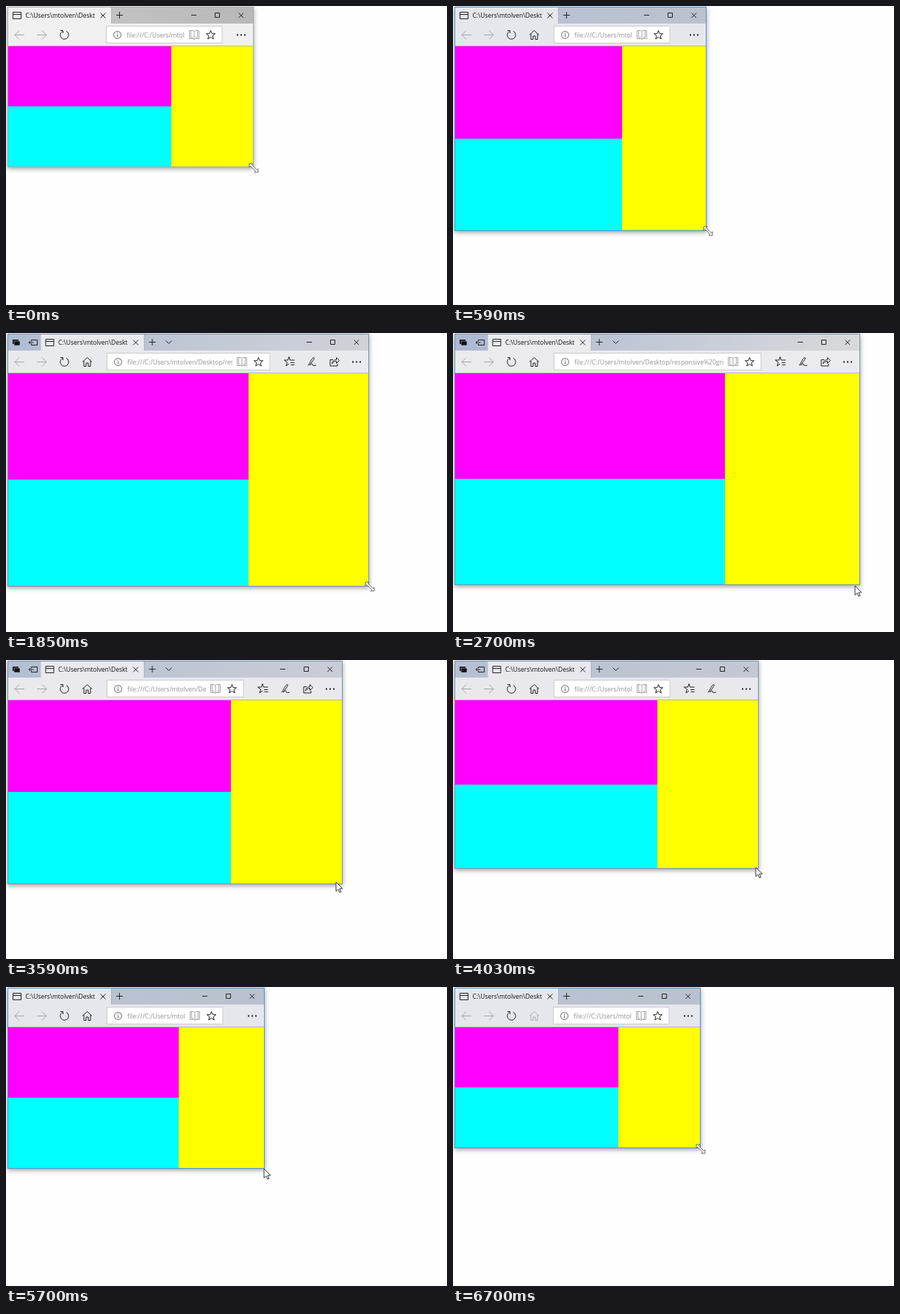
Recreate the animation shown at these times as an HTML page. Size 600 by 408 pixels, loop 6.74 s.

```html
<!DOCTYPE html>
<html lang="en">
<head>
<meta charset="utf-8">
<title>Responsive grid in a resized browser window</title>
<style>
  html, body { margin: 0; width: 100%; height: 100%; overflow: hidden; background: #fefefe; }
  svg { display: block; width: 600px; height: 408px; }
  text { font-family: "Open Sans", "Noto Sans", sans-serif; white-space: pre; }
  .line { fill: none; stroke: #222; stroke-width: 1; }
  .dim { stroke: #a6a6a6; }
  #shadow { filter: drop-shadow(0 2px 3px rgba(0, 0, 0, .38)); }
</style>
</head>
<body>
<svg viewBox="0 0 600 408">
  <defs>
    <linearGradient id="titleFill">
      <stop id="titleLeft" offset="0"/>
      <stop id="titleRight" offset="1"/>
    </linearGradient>
    <clipPath id="tabClip"><rect x="26" y="4" width="95" height="18"/></clipPath>
    <clipPath id="urlClip"><rect id="urlBox" x="160" y="28" height="22"/></clipPath>
  </defs>

  <rect id="shadow" x="2" y="1" fill="#999"/>
  <rect id="titleBar" x="3" y="2" height="23" fill="url(#titleFill)"/>
  <rect id="toolbar" x="3" y="24" height="31"/>
  <path id="toolbarEdge" class="line" stroke-opacity=".25"/>

  <g id="tabActions">
    <path d="M9 9h8v6H9z" fill="#111"/>
    <path d="M11 11h8v6h-8z" fill="#111" stroke="#b3bfd6" stroke-width=".6"/>
    <path class="line" d="M34.5 11.5v-2h8v7h-8v-2M31 13h6.500M33 11l-2 2 2 2"/>
    <path class="line" d="M217.500 10.500l4 4 4-4"/>
  </g>

  <g id="tab">
    <rect id="tabFill" x="3" y="2" width="140.500" height="23"/>
    <path class="line" d="M143.500 2v22" stroke-opacity=".2"/>
    <path class="line" d="M9.500 8.500h11v9h-11zM9.500 11.500h11"/>
    <text x="26.500" y="16" font-size="8.500" fill="#111" clip-path="url(#tabClip)">C:\Users\mtolven\Desktop</text>
    <path class="line" d="M128.500 9.500l7 7m0-7l-7 7M150 12.500h9M154.500 8v9"/>
  </g>

  <path class="line dim" d="M25 39.500H12M18 33.500l-6 6 6 6M42 39.500h13M49 33.500l6 6-6 6"/>
  <path class="line" stroke-width="1.200" d="M76.500 34.700a5.700 5.700 0 1 0 5.500-.3M74 33.500h3.500v3.500"/>
  <path id="home" class="line" d="M104 39.500l6.500-6 6.500 6M106 38v7.500h3v-4.500h3v4.500h3V38"/>

  <g id="address">
    <rect id="addressBox" x="137.500" y="27.500" height="23" fill="#fff" stroke="#cbcbcb"/>
    <circle cx="152.500" cy="39.500" r="5" class="line" style="stroke:#666"/>
    <path class="line" style="stroke:#666" d="M152.500 38.500v4M152.500 36.200v1.200"/>
    <text x="165" y="43" font-size="8.580" fill="#929292" clip-path="url(#urlClip)">file:///C:/Users/mtolven/Desktop/responsive%20grid</text>
    <g id="addressEnd">
      <path class="line dim" d="M-44.500 33.500h5l1.500 1 1.500-1h5v11h-5l-1.500 1-1.500-1h-5zM-38 34.500v11M-42.500 33.500v9.500h3M-33.500 33.500v9.500h-3"/>
      <path id="star" class="line" stroke-width="1.200"/>
      <g id="favorites">
        <path class="line" d="M26 42l-4 3 1.500-5-4-3h5l1.500-4.500 1.500 4.500h6M28 40.500h5.500M28.500 43.500h5"/>
      </g>
      <g id="pen">
        <path class="line" d="M52 44.500c2-3 6-12 8-11s-4 7-6 10.500c3-2 4-3 4-1s2 2 5 1"/>
      </g>
      <g id="share">
        <path class="line" d="M86 36.500h-4v8.500h10v-3M84.500 42c.5-4 3-5.500 6-5.500V33.500l4 4-4 4v-3c-3 0-4.500 1-6 3.500z"/>
      </g>
    </g>
  </g>

  <g id="windowActions">
    <path class="line" d="M-84 12.500h7M-51.500 9.500h6v6h-6zM-19.500 9.500l6.500 6.500m0-6.500l-6.500 6.500"/>
    <path d="M-22 38.500h2v2h-2zM-17 38.500h2v2h-2zM-12 38.500h2v2h-2z" fill="#222"/>
  </g>

  <rect id="magenta" x="3" y="55" fill="#f0f"/>
  <rect id="cyan" x="3" fill="#0ff"/>
  <rect id="yellow" y="55" fill="#ff0"/>
  <rect id="frame" x="2.500" y="1.500" fill="none"/>

  <path id="arrow" d="M0 0v12.500l2.900-2.700 2 4.400 2-.9-2-4.300h4z" fill="#fff" stroke="#222" stroke-width=".9"/>
  <path id="resize" d="M-6-6h5l-1.700 1.700 7 7L6 1v5H1l1.700-1.700-7-7L-6-1z" fill="#fff" stroke="#444" stroke-width=".8"/>
</svg>
<script>
const LOOP = 6740;
const MIN_ADDRESS_END = 295;

// time, window right, window bottom, pointer offset x and y
const KEYS = [
  [0, 336, 219, 1, 2],
  [700, 346, 322, 3, 1],
  [1180, 355, 370, 6, -2],
  [1400, 405, 348, 3, 0],
  [2110, 543, 344, 2, 1],
  [2480, 553, 343, -6, 2],
  [2700, 553, 343, -6, 2],
  [3310, 503, 325, -7, -1],
  [3590, 457, 305, -8, -2],
  [4015, 416, 285, -3, -1],
  [4550, 382, 268, -1, 0],
  [5420, 357, 252, 0, 0],
  [5700, 351, 247, 0, 1],
  [6120, 345, 234, 0, 1],
  [6700, 336.4, 219, 1, 2],
  [LOOP, 336, 219, 1, 2]
];

const el = id => document.getElementById(id);
const clamp = v => Math.max(0, Math.min(1, v));
const lerp = (a, b, k) => a + (b - a) * k;
const mix = (a, b, k) => `rgb(${a.map((v, i) => Math.round(lerp(v, b[i], k)))})`;

function set(id, attrs) {
  for (const name in attrs) el(id).setAttribute(name, attrs[name]);
}
function move(id, x, y = 0) {
  set(id, { transform: `translate(${x} ${y})` });
}
function show(id, visible) {
  set(id, { visibility: visible ? "visible" : "hidden" });
}

function poseAt(t) {
  const i = KEYS.findIndex(key => key[0] > t);
  const a = KEYS[i - 1], b = KEYS[i];
  const k = (t - a[0]) / (b[0] - a[0]);
  return a.slice(1).map((v, n) => lerp(v, b[n + 1], k));
}

function starPath(cx, cy, outer, inner) {
  const points = Array.from({ length: 10 }, (_, i) => {
    const r = i % 2 ? inner : outer, a = i * Math.PI / 5 - Math.PI / 2;
    return `${(cx + r * Math.cos(a)).toFixed(1)} ${(cy + r * Math.sin(a)).toFixed(1)}`;
  });
  return `M${points.join("L")}Z`;
}

function drawChrome(t, right) {
  const active = t >= 30;
  const wideness = clamp((right - 355) / 198);
  const surface = active ? mix([230, 231, 237], [235, 235, 238], wideness) : "#f0f0f0";
  const wide = right >= 368;
  const shift = right < 338 ? -1 : 0;
  const addressEnd = Math.max(MIN_ADDRESS_END, right - 134);

  set("titleLeft", { "stop-color": active ? mix([186, 195, 212], [172, 185, 210], wideness) : "#cacaca" });
  set("titleRight", { "stop-color": active ? mix([187, 193, 206], [217, 217, 219], wideness) : "#b8b8b8" });
  set("titleBar", { width: right - 3 });
  set("toolbar", { width: right - 3, fill: surface });
  set("tabFill", { fill: surface });
  set("toolbarEdge", { d: `M3 54.5H${right}` });

  show("tabActions", wide);
  move("tab", wide ? 44.5 : 0);
  set("home", { opacity: clamp((right - 336.1) * .9) });

  move("address", shift);
  set("addressBox", { width: addressEnd - 137.5 });
  set("urlBox", { width: addressEnd - 211 });
  move("addressEnd", addressEnd);
  show("favorites", wide);
  show("pen", right >= 398);
  show("share", right >= 429);
  move("windowActions", right);
}

function drawPage(right, bottom) {
  const column = Math.round(3 + (right - 3) * 2 / 3);
  const row = Math.round((55 + bottom) / 2);
  set("magenta", { width: column - 3, height: row - 55 });
  set("cyan", { y: row, width: column - 3, height: bottom - row });
  set("yellow", { x: column, width: right - column, height: bottom - 55 });
}

function draw(t) {
  const [exactRight, exactBottom, dx, dy] = poseAt(t);
  const right = Math.round(exactRight), bottom = Math.round(exactBottom);
  const usesArrow = t > 2250 && t < 6300;

  set("shadow", { width: right - 1, height: bottom });
  set("frame", {
    width: right - 2, height: bottom - 1,
    stroke: t < 30 ? "#a5a9ad" : right > 400 ? "#7893ad" : "#4b96d3"
  });
  drawChrome(t, right);
  set("home", { opacity: clamp((exactRight - 336.1) * .9) });
  drawPage(right, bottom);

  show("arrow", usesArrow);
  show("resize", !usesArrow);
  move(usesArrow ? "arrow" : "resize", right + Math.round(dx), bottom + Math.round(dy));
}

set("star", { d: starPath(-15.5, 39.8, 6.4, 2.7) });
const start = performance.now();
function tick() {
  draw((performance.now() - start) % LOOP);
  requestAnimationFrame(tick);
}
draw(0);
requestAnimationFrame(tick);
</script>
</body>
</html>
```
